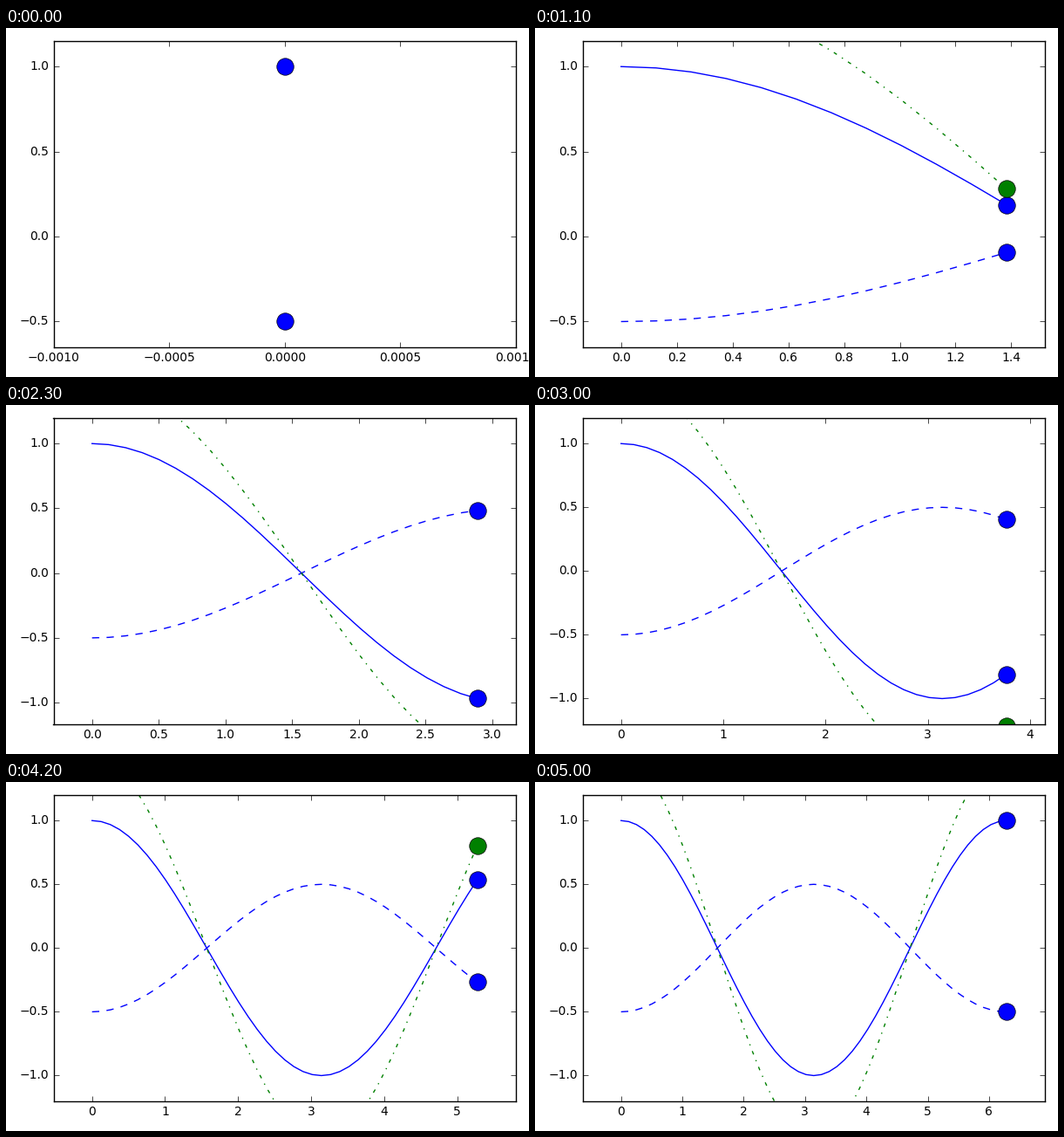
Write a matplotlib script that moves like this. It is 600 px wide and 400 px high and loops after 5.1 s.

```python
import numpy as np
import matplotlib.pyplot as plt
from matplotlib.animation import FuncAnimation
from matplotlib.ticker import MaxNLocator, MultipleLocator

W, H, DPI = 600, 400, 100
STEPS = 50
INTERVAL = 100

plt.style.use("classic")
plt.rcParams.update({
    "font.family": "DejaVu Sans",
    "font.size": 10,
    "figure.dpi": DPI,
    "savefig.dpi": "figure",
    "figure.facecolor": "white",
    "savefig.facecolor": "white",
})

fig = plt.figure(figsize=(W / DPI, H / DPI), dpi=DPI)
left, right, top, bottom = 54.5, 585, 15, 365.7
ax = fig.add_axes([left / W, 1 - bottom / H,
                   (right - left) / W, (bottom - top) / H])
ax.xaxis.set_major_locator(MaxNLocator(9, steps=[1, 2, 5, 10]))
ax.yaxis.set_major_locator(MultipleLocator(0.5))

t = np.linspace(0, 2 * np.pi, STEPS + 1)


def make_curve(amplitude, color, style):
    """Return the samples with their trail and the dot at its head."""
    trail, = ax.plot([], [], color=color, linestyle=style, linewidth=1)
    head, = ax.plot([], [], "o", color=color, markersize=14,
                    markeredgecolor="black", markeredgewidth=0.5)
    return amplitude * np.cos(t), trail, head


curves = [
    make_curve(1.0, "b", "-"),
    make_curve(-0.5, "b", "--"),
    make_curve(1.5, "g", "-."),
]


def padded(low, high):
    pad = 0.1 * (high - low)
    return low - pad, high + pad


def update(i):
    for y, trail, head in curves:
        trail.set_data(t[:i + 1], y[:i + 1])
        head.set_data([t[i]], [y[i]])

    # The view follows the two blue curves only.
    seen = np.concatenate([y[:i + 1] for y, _, _ in curves[:2]])
    ax.set_ylim(*padded(seen.min(), seen.max()))
    ax.set_xlim(*(padded(0, t[i]) if i else (-0.001, 0.001)))
    return [artist for _, *pair in curves for artist in pair]


anim = FuncAnimation(fig, update, frames=STEPS + 1, interval=INTERVAL,
                     init_func=lambda: update(0), repeat=True,
                     repeat_delay=0, blit=False)
plt.show()
```
